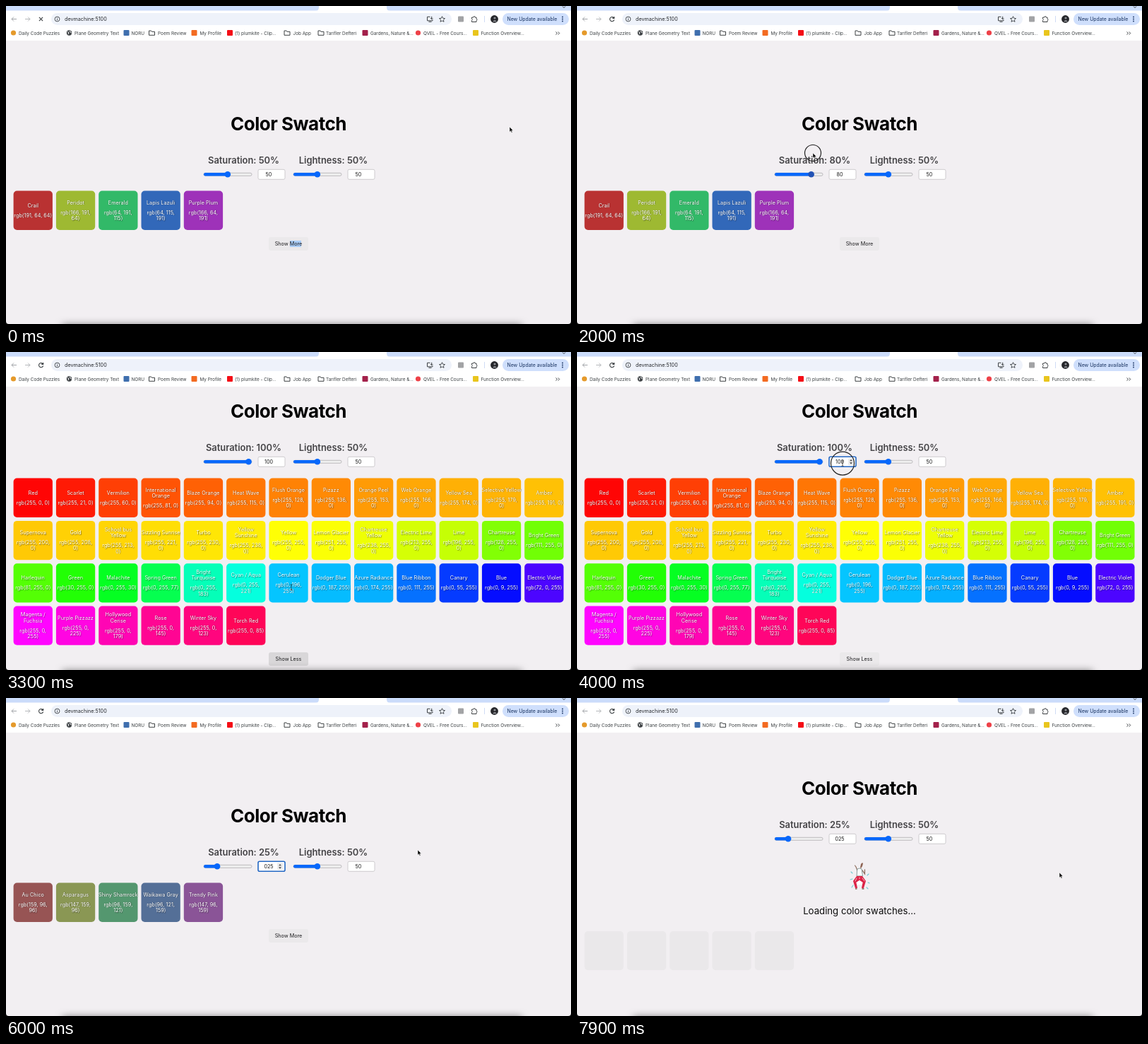
An HTML page with a canvas for the animation above (8 s loop, 800 by 450 pixels).

```html
<!DOCTYPE html>
<html lang="en">
<head>
<meta charset="utf-8">
<title>Color Swatch</title>
<style>
html, body { margin: 0; width: 100%; height: 100%; overflow: hidden; background: #f2eff2; }
canvas { display: block; width: 800px; height: 450px; }
</style>
</head>
<body>
<canvas id="stage" width="800" height="450"></canvas>
<script>
const ctx = document.getElementById('stage').getContext('2d');
const LOOP = 8000, TICK = 100, COLUMNS = 13, PITCH = 60.3, TILE = 55.3, LEFT = 10.6;
const BLUE = '#0868fb', INK = '#3c4043';

// Each entry is a colour name followed by its hue; "|" is a line break.
const parse = list => list.split(', ').map(entry => {
  const [, name, hue] = entry.match(/^(.*) (\d+)$/);
  return { name: name.split('|'), hue: +hue };
});
const palettes = {
  50: {
    few: parse('Crail 0, Peridot 72, Emerald 144, Lapis Lazuli 216, Purple Plum 288'),
    all: parse('Crail 0, Flame Pea 10, Brown Rust 18, Copper 26, Marigold 35, Tussock 42, Turmeric 52, Earls Green 60, Peridot 72, Sushi 85, Apple 100, Fruit Salad 118, Chateau Green 134, Emerald 144, Ocean Green 156, Keppel 170, Pelorous 186, Boston Blue 200, Lapis Lazuli 216, Indigo 232, Blue Violet 255, Purple Plum 288, Fuchsia 302, Mulberry 325')
  },
  100: {
    few: parse('Red 0, Electric Lime 72, Spring Green 144, Blue Ribbon 216, Electric Violet 288'),
    all: parse('Red 0, Scarlet 5, Vermilion 14, International|Orange 19, Blaze Orange 22, Heat Wave 27, Flush Orange 30, Pizazz 32, Orange Peel 36, Web Orange 39, Yellow Sea 41, Selective Yellow 42, Amber 45, ' +
      'Supernova 47, Gold 49, School bus|Yellow 50, Sizzling Sunrise 52, Turbo 54, Yellow|Sunshine 56, Yellow 60, Lemon Glacier 61, Chartreuse|Yellow 64, Electric Lime 70, Lime 74, Chartreuse 90, Bright Green 94, ' +
      'Harlequin 101, Green 113, Malachite 127, Spring Green 138, Bright|Turquoise 163, Cyan / Aqua 172, Cerulean 194, Dodger Blue 196, Azure Radiance 199, Blue Ribbon 214, Canary 227, Blue 238, Electric Violet 257, ' +
      'Magenta /|Fuchsia 300, Purple Pizzazz 307, Hollywood|Cerise 318, Rose 326, Winter Sky 331, Torch Red 340')
  },
  25: {
    few: parse('Au Chico 0, Asparagus 72, Shiny Shamrock 144, Waikawa Gray 216, Trendy Pink 288'),
    all: parse('Au Chico 0, Leather 24, Barley Corn 46, Asparagus 72, Laurel 110, Shiny Shamrock 144, Patina 168, Hoki 196, Waikawa Gray 216, Scampi 244, Trendy Pink 288, Tapestry 328')
  }
};

const steps = [
  [0, { sat: 50, field: '50', view: 'few', set: 50, stopIcon: true, selected: true, hot: false, focus: false, pointer: 'arrow' }],
  [300, { stopIcon: false }],
  [900, { selected: false, hot: true, pointer: 'hand' }],
  [1300, { view: 'all', pointer: 'arrow' }],
  [1500, { hot: false }],
  [1900, { sat: 65, field: '65', view: 'few' }],
  [2000, { sat: 80, field: '80' }],
  [2100, { sat: 92, field: '92' }],
  [2200, { sat: 100, field: '100' }],
  [2400, { view: 'loading' }],
  [2800, { view: 'few', set: 100 }],
  [3000, { hot: true, pointer: 'hand' }],
  [3200, { view: 'all', pointer: 'beam' }],
  [3500, { hot: false, pointer: 'arrow' }],
  [3800, { pointer: 'beam' }],
  [3900, { focus: true }],
  [4500, { pointer: 'none' }],
  [4600, { sat: 1, field: '1', view: 'few' }],
  [4800, { sat: 0, field: '0' }],
  [5000, { sat: 2, field: '02' }],
  [5100, { sat: 25, field: '025' }],
  [5400, { view: 'loading' }],
  [5700, { pointer: 'arrow' }],
  [5800, { view: 'few', set: 25 }],
  [6500, { hot: true, pointer: 'hand' }],
  [6600, { focus: false }],
  [6700, { view: 'all' }],
  [6900, { hot: false, pointer: 'arrow' }],
  [7400, { view: 'loading' }]
];
const path = [
  [0, 713, 171], [200, 713, 171], [950, 396, 339], [1300, 396, 339], [1750, 313, 208], [1850, 313, 208],
  [2000, 334, 208], [2200, 349, 208], [2500, 352, 215], [2950, 402, 336], [3300, 404, 333], [3800, 376, 155],
  [5700, 376, 238], [6000, 583, 215], [6500, 402, 338], [6750, 402, 338], [7150, 440, 237], [7350, 440, 237],
  [7800, 683, 247], [8000, 683, 247]
];
const presses = [[1100, 1150], [1800, 2200], [3000, 3050], [3900, 3950], [6600, 6650], [7250, 7300]];

const stateAt = t => Object.assign({}, ...steps.filter(([at]) => at <= t).map(([, change]) => change));

function pointerAt(t) {
  const i = Math.max(1, path.findIndex(([at]) => at > t));
  const [t0, x0, y0] = path[i - 1], [t1, x1, y1] = path[i];
  const u = (t - t0) / (t1 - t0), k = u * u * (3 - 2 * u);
  return [x0 + (x1 - x0) * k, y0 + (y1 - y0) * k];
}

function text(str, x, y, size, { color = INK, weight = 400, align = 'left', spacing = 0 } = {}) {
  ctx.font = `${weight} ${size}px Inter, sans-serif`;
  ctx.letterSpacing = spacing + 'px';
  ctx.textAlign = align;
  ctx.fillStyle = color;
  ctx.fillText(str, x, y + size * 0.36);
}
function box(x, y, w, h, r, fill, stroke, width = 1) {
  ctx.beginPath();
  ctx.roundRect(x, y, w, h, r);
  paint(fill, stroke, width);
}
function disc(x, y, r, fill, stroke, width = 1) {
  ctx.beginPath();
  ctx.arc(x, y, r, 0, Math.PI * 2);
  paint(fill, stroke, width);
}
function shape(d, x, y, fill, stroke, width = 1) {
  const p = new Path2D(d);
  ctx.save();
  ctx.translate(x, y);
  paint(fill, stroke, width, p);
  ctx.restore();
}
function paint(fill, stroke, width, p) {
  ctx.lineWidth = width;
  if (fill) { ctx.fillStyle = fill; p ? ctx.fill(p) : ctx.fill(); }
  if (stroke) { ctx.strokeStyle = stroke; p ? ctx.stroke(p) : ctx.stroke(); }
}

const bookmarkIcons = {
  dot: (x, color) => disc(x, 38, 3.6, color),
  square: (x, color) => box(x - 4, 34, 8, 8, 1, color),
  folder: x => shape('M-4-3h3l1 1.3h4v5h-8z', x, 38, null, INK, 1),
  globe: x => {
    disc(x, 38, 3.7, INK);
    shape('M-2.5-1.5l2 1-1 2.5M1-3l.5 2 1.6 1', x, 38, null, '#fff', 1);
  }
};
const bookmarks = [
  ['Daily Code Puzzles', 10.5, 18, 'dot', '#e59a2b'],
  ['Plane Geometry Text', 89.5, 97, 'globe'],
  ['NORU', 170.5, 177.5, 'square', '#3f6fae'],
  ['Poem Review', 206.5, 215, 'folder'],
  ['My Profile', 266.5, 274.5, 'square', '#f36b21'],
  ['(1) plumkite - Clip...', 317, 324, 'square', '#f40d16'],
  ['Job App', 398, 406.5, 'folder'],
  ['Tarifler Defteri', 446, 453, 'folder'],
  ['Gardens, Nature &...', 508.5, 516, 'square', '#a3214b'],
  ['QVEL - Free Cours...', 583.5, 591, 'dot', '#ee4148'],
  ['Function Overview...', 665, 672.5, 'square', '#e9c51d']
];

function drawBrowser(s) {
  ctx.fillStyle = '#fff';
  ctx.fillRect(0, 0, 800, 49);
  ctx.fillStyle = '#cbdcfa';
  ctx.fillRect(0, 0, 800, 6.5);
  shape('M438 7q5 0 5-5v-2h96v2q0 5 5 5z', 0, 0, '#fff');
  shape('M-2-1l2 2 2-2', 790, 1.5, null, INK);

  shape('M3.5 0h-7M-.5-3l-3 3 3 3', 11.5, 18.5, null, '#a3a6aa');
  shape('M-3.5 0h7M.5-3l3 3-3 3', 30.5, 18.5, null, '#b7babd');
  if (s.stopIcon) shape('M-2.6-2.6l5.2 5.2M2.6-2.6l-5.2 5.2', 49.5, 18.5, null, INK, 1.1);
  else shape('M2.8-1.4a3.1 3.1 0 1 0 .3 2.4M3.2-3.6v2.5h-2.5', 49.5, 18.5, null, INK, 1.1);

  box(64, 10, 567, 17, 8.5, '#eef2fa');
  disc(72.5, 18.5, 3.4, null, INK, 0.9);
  shape('M0-.4v2.2M0-1.9v.9', 72.5, 18.5, null, INK, 0.9);
  text('devmachine:5100', 83, 18.7, 7.2, { color: '#24272b' });
  shape('M0-3h-4v5.5h7.5v-1.5M-2 4h4M2.2-3.5v4M.5-1.2l1.7 1.7 1.7-1.7', 600.5, 18.3, null, INK, 1);
  shape('M0-4l1.2 2.6 2.8.3-2.1 1.9.6 2.8-2.5-1.4-2.5 1.4.6-2.8-2.1-1.9 2.8-.3z', 617.5, 18.7, null, INK, 0.9);
  box(640, 14.5, 8, 8, 1, '#a2a3a5');
  shape('M-3.5-2.2h2.2a1.3 1.3 0 0 1 2.6 0h1.7v2a1.3 1.3 0 0 1 0 2.5v1.9h-6.5v-2a1.3 1.3 0 0 0 0-2.4z', 663, 18.3, null, INK, 1);
  ctx.fillStyle = '#cfdcf5';
  ctx.fillRect(677, 14, 1, 9);
  disc(691.5, 18.5, 5.4, '#25262a');
  disc(692, 17, 1.6, '#8d8f94');
  shape('M-3 3.8q3-4.5 6 0', 692, 18.5, '#8d8f94');

  box(703, 10, 94, 17, 8.5, '#cfdffc');
  text('New Update available', 709.5, 18.7, 6.9, { color: '#17315f' });
  for (const dy of [-3, 0, 3]) disc(788, 18.5 + dy, 0.9, '#17315f');

  for (const [label, iconX, textX, icon, color] of bookmarks) {
    bookmarkIcons[icon](iconX, color);
    text(label, textX, 38.4, 6.4);
  }
  shape('M-2.5-2l2 2-2 2M.7-2l2 2-2 2', 781, 38.5, null, INK, 1);
}

function drawControl(label, x, y, value, field, active, focus) {
  text(`${label}: ${value}%`, x + 56.5, y, 12.9, { color: '#454447', weight: 600, align: 'center' });
  const cy = y + 20.3, thumb = x + 4.2 + value * 0.593;
  box(x, cy - 2, 68, 4, 2, '#efefef', '#b0aeb1', 0.8);
  box(x, cy - 2.3, thumb - x, 4.6, 2.3, BLUE);
  disc(thumb, cy, 4.3, active ? '#2353b5' : BLUE);
  box(x + 77, cy - 7, 38, 14, 2, '#fff', focus ? '#2468c4' : '#c9c7ca', focus ? 1.6 : 0.9);
  text(field, x + 92, cy, 7.2, { color: '#161616', align: 'center' });
  if (focus) {
    box(x + 104, cy - 5, 8, 10, 1, '#ececec');
    shape('M-2-1l2-2.4 2 2.4zM-2 1l2 2.4 2-2.4z', x + 108, cy, '#4c4c4c');
  }
}

function rgbOf(hue, sat) {
  const c = sat / 100;
  return [0, 8, 4].map(n => {
    const k = (n + hue / 30) % 12;
    return Math.round(255 * (0.5 - c / 2 * Math.max(-1, Math.min(k - 3, 9 - k, 1))) + 1e-6);
  });
}
function widthOf(line) {
  ctx.font = '400 7.3px Inter, sans-serif';
  ctx.letterSpacing = '0px';
  return ctx.measureText(line).width;
}
// The widest label that still fits on one line of a tile.
const WIDEST = 'rgb(0, 174, 255)';
function rgbLines(channels) {
  const line = `rgb(${channels.join(', ')})`;
  if (widthOf(line) <= widthOf(WIDEST) + 0.1) return [line];
  const cut = line.lastIndexOf(' ');
  return [line.slice(0, cut), line.slice(cut + 1)];
}

function drawSwatch({ name, hue }, sat, x, y) {
  const fill = sat === 100 ? `hsl(${hue} 100% 51%)` : `hsl(${hue} ${sat * 1.15}% 46%)`;
  box(x, y, TILE, TILE, 5, fill);
  const lines = [...name, ...rgbLines(rgbOf(hue, sat))];
  let ly = y + TILE / 2 - ((lines.length - 1) * 8.5 + 5.5) / 2;
  ctx.save();
  ctx.shadowColor = 'rgba(0,0,0,.5)';
  ctx.shadowOffsetX = ctx.shadowOffsetY = 0.6;
  ctx.shadowBlur = 1;
  lines.forEach((line, i) => {
    if (i === name.length) ly += 5.5;
    text(line, x + TILE / 2, ly, 7.3, { color: '#fff', align: 'center' });
    ly += 8.5;
  });
  ctx.restore();
}

function drawDancer(t) {
  const beat = Math.sin(t / LOOP * Math.PI * 32 + 1.2), lift = beat * 0.8;
  ctx.save();
  ctx.translate(400, 253 + lift);
  ctx.lineCap = 'round';
  shape(`M-3-9l-2 ${-5 - beat}-1.5-2M4-9l3.5 5 ${beat}-6`, 0, 0, null, '#8d6c5c', 1.2);
  shape('M-3-11q3-2 6 0l1.5 10h-8z', 0, 0, '#fbfcfc', '#5e7778', 0.7);
  shape('M1-13l1-5q2-3 3-1l-1 4-2 3z', 0, 0, '#8d6252');
  shape('M-4-1h8l5 7-3 10h-3l1.5-8-4.5-3-4.5 3 1.5 8h-3l-3-10z', 0, -lift, '#dc2447');
  shape('M0 5l4.5 3-1 4q-3.5-2-7 0l-1-4z', 0, -lift, '#fff');
  shape('M-4 2l-2 4M0 1v2M4 2l3 4', 0, -lift, null, '#fff', 0.7);
  shape('M-4 17h-1.5M4 17h2', 0, -lift, null, '#7d5748', 1.3);
  shape('M-10-5l-2-2M-10 3l-3 1M-9 12l-2 3M11-2l2-2M12 8l2 1M10 15l2 2', 0, -lift, null, '#73cbd2', 1.1);
  ctx.restore();
}

function drawPage(s, t) {
  ctx.fillStyle = '#f2eff2';
  ctx.fillRect(0, 49, 800, 401);
  const loading = s.view === 'loading';
  const tiles = loading ? [] : palettes[s.set][s.view];
  const extra = Math.max(0, Math.ceil(tiles.length / COLUMNS) - 1) * PITCH;
  const shift = loading ? -39 : -Math.min(83, extra / 2);
  const dragging = t >= 1800 && t < 2200;

  text('Color Swatch', 400, 167 + shift, 26, { color: '#000', weight: 700, align: 'center', spacing: -0.5 });
  drawControl('Saturation', 280, 218 + shift, s.sat, s.field, dragging, s.focus);
  drawControl('Lightness', 407, 218 + shift, 50, '50', false, false);

  if (loading) {
    drawDancer(t);
    text('Loading color swatches...', 400, 300.8, 13.2, { color: '#0b0b0b', align: 'center' });
    for (let i = 0; i < 5; i++) box(LEFT + i * PITCH, 330, TILE, TILE, 5, '#eae8ea');
  } else {
    tiles.forEach((tile, i) => drawSwatch(tile, s.set,
      LEFT + i % COLUMNS * PITCH, 261.6 + shift + Math.floor(i / COLUMNS) * PITCH));
    const y = 336.5 + shift + extra;
    box(372, y - 9.5, 56, 19, 3, s.hot ? '#d9d7d9' : '#ebe9eb');
    if (s.selected) {
      ctx.fillStyle = '#a9ccf7';
      ctx.fillRect(402, y - 4.5, 16, 9);
    }
    text(s.view === 'all' ? 'Show Less' : 'Show More', 400, y, 7.2, { color: '#1c1c1e', align: 'center' });
  }

  ctx.save();
  ctx.shadowColor = 'rgba(0,0,0,.5)';
  ctx.shadowBlur = 11;
  ctx.fillStyle = '#888';
  ctx.fillRect(80, 451, 650, 10);
  ctx.restore();
  shape('M0 446q0 4 4 4h-4zM800 446q0 4-4 4h4z', 0, 0, '#111');
}

function drawPointer(kind, t) {
  const [x, y] = pointerAt(t);
  const press = presses.find(([down, up]) => t >= down && t <= up + 150);
  if (press) disc(x, y, t <= press[1] ? 11.5 : 11.5 + Math.min(1, (t - press[1]) / 50) * 5, null, '#222', 1.2);
  if (kind === 'arrow') shape('M0 0v7.2l1.6-1.5 1.2 2.6 1.2-.6-1.2-2.5h2.2z', x, y, '#000', '#fff', 0.5);
  if (kind === 'hand') shape('M-.8 0q.8-.8 1.4 0v3l3 .8q1 .4.7 2l-.6 2.6h-4l-2.6-3.2q0-1 1-.6l1.1.8z', x, y, '#fff', '#111', 0.8);
  if (kind === 'beam') shape('M-1.5-4q1.5 0 1.5 1 0-1 1.5-1M0-3v6M-1.5 4q1.5 0 1.5-1 0 1 1.5 1', x, y, null, '#333', 0.8);
}

function frame() {
  const t = Math.floor(performance.now() % LOOP / TICK) * TICK;
  const s = stateAt(t);
  drawPage(s, t);
  drawBrowser(s);
  drawPointer(s.pointer, t);
  requestAnimationFrame(frame);
}
frame();
</script>
</body>
</html>
```
